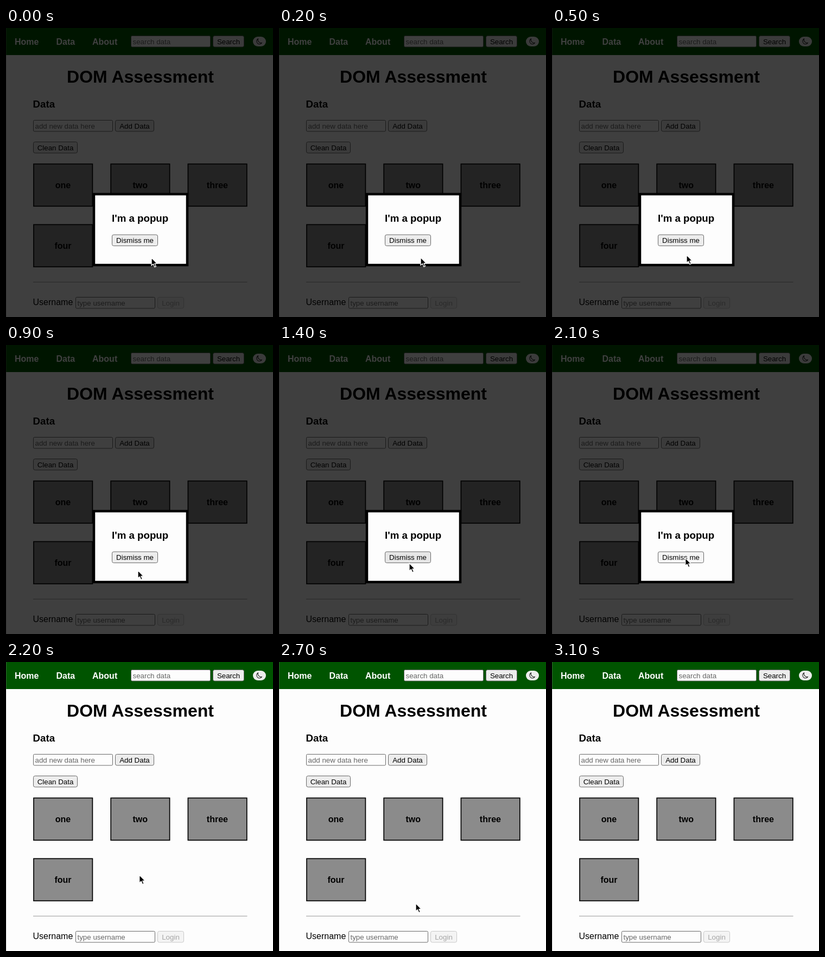
These frames come from a looping animation (492x534 px, 3500 ms). An HTML page:

```html
<!DOCTYPE html>
<html lang="en">
<head>
<meta charset="utf-8">
<title>Popup demo</title>
<style>
  html, body { margin: 0; width: 100%; height: 100%; overflow: hidden; background: #fdfdfd; }
  svg { display: block; font: 13.333px "Liberation Sans", Arial, sans-serif; }
  .h1 { font: bold 32px "Liberation Sans", Arial, sans-serif; }
  .h3 { font: bold 18.72px "Liberation Sans", Arial, sans-serif; }
  .bold { font: bold 16px "Liberation Sans", Arial, sans-serif; }
  .label { font-size: 16px; }
  .nav { fill: #fff; }
  .hint { fill: #666; }
  .off { fill: #a5a5a5; }
  .mid { text-anchor: middle; }
</style>
</head>
<body>
<svg width="492" height="534" viewBox="0 0 492 534">
  <g id="page"></g>
  <g id="modal">
    <rect width="492" height="534" fill-opacity=".75"/>
    <rect x="162" y="307" width="172" height="131" fill="#fdfdfd" stroke="#000" stroke-width="4.5"/>
  </g>
  <path id="cursor" d="M0 0V14.6L3.4 11.6 5.8 17.2 8.4 16.1 6 10.7H10.5Z"
        stroke="#fff" stroke-width="1.3" stroke-linejoin="round"/>
</svg>
<script>
const LOOP = 3500, STEP = 100, DISMISS = 2200, GONE = 2800;
const page = document.getElementById("page");
const modal = document.getElementById("modal");
const cursor = document.getElementById("cursor");

function add(parent, tag, attrs, content = "") {
  const node = document.createElementNS("http://www.w3.org/2000/svg", tag);
  for (const key in attrs) node.setAttribute(key, attrs[key]);
  node.textContent = content;
  return parent.appendChild(node);
}

const text = (parent, x, y, content, cls = "") =>
  add(parent, "text", { x, y, class: cls }, content);

const box = (parent, x, y, width, height, fill, stroke, rx = 0, line = 1) =>
  add(parent, "rect", { x, y, width, height, fill, stroke, rx, "stroke-width": line });

function input(x, y, hint) {
  box(page, x + .5, y + .5, 146, 20.5, "#fdfdfd", "#686868", 2);
  text(page, x + 3.5, y + 15.5, hint, "hint");
}

function button(parent, x, y, width, label, off) {
  const face = box(parent, x + .5, y + .5, width - 1, 20.5,
    off ? "#f4f4f4" : "#ededed", off ? "#c8c8c8" : "#686868", 3);
  text(parent, x + width / 2, y + 15.5, label, off ? "mid off" : "mid");
  return face;
}

box(page, 0, 0, 492, 50, "#005400", "none");
[["Home", 16], ["Data", 92.5], ["About", 159]]
  .forEach(([label, x]) => text(page, x, 30.5, label, "bold nav"));
input(230, 14, "search data");
button(page, 381, 14, 58, "Search");
box(page, 455, 16, 24, 18, "#ededed", "none", 9);
add(page, "path", {
  d: "M464.6 19.8A5.3 5.3 0 1 0 471.6 27.3 5.7 5.7 0 0 1 464.6 19.8Z",
  fill: "none", stroke: "#222", "stroke-width": 1.1, "stroke-linejoin": "round"
});

text(page, 247.5, 101, "DOM Assessment", "h1 mid");
text(page, 49.5, 147, "Data", "h3");
input(50, 170, "add new data here");
button(page, 201, 170, 72, "Add Data");
button(page, 50, 210, 82, "Clean Data");
["one", "two", "three", "four"].forEach((label, i) => {
  const x = 51 + i % 3 * 142.2, y = 251.3 + Math.floor(i / 3) * 112;
  box(page, x, y, 108.4, 78, "#8b8b8b", "#000", 0, 1.7);
  text(page, x + 54, y + 44.5, label, "bold mid");
});
box(page, 50, 469, 394.5, 1, "#9a9a9a", "none");
text(page, 49.5, 512, "Username", "label");
input(128, 497, "type username");
button(page, 279, 497, 49, "Login", true);
box(page, 0, 0, 1, 534, "#888", "none").setAttribute("fill-opacity", .35);

text(modal, 195, 358, "I'm a popup", "h3");
const dismiss = button(modal, 195, 381.5, 85, "Dismiss me");

// [time, x, y] of the pointer tip
const path = [
  [0, 268, 424.5], [100, 266, 425], [300, 256, 423], [500, 248, 419.5], [600, 248, 419.5],
  [700, 250, 418.5], [900, 243, 416.5], [1100, 226, 406], [1200, 235, 411],
  [1400, 240, 403], [1700, 246, 394], [2000, 246, 394], [2100, 245.7, 393.5],
  [2600, 246, 394], [2700, 252, 446], [3500, 252, 446]
];

function tipAt(t) {
  const i = path.findIndex(key => key[0] > t);
  const [t0, x0, y0] = path[i - 1], [t1, x1, y1] = path[i];
  const k = (t - t0) / (t1 - t0);
  return [x0 + (x1 - x0) * k, y0 + (y1 - y0) * k];
}

function draw(now) {
  const t = Math.floor(now % LOOP / STEP) * STEP;
  const [x, y] = tipAt(t);
  cursor.setAttribute("transform", `translate(${x} ${y})`);
  cursor.style.display = t < GONE ? "" : "none";
  modal.style.display = t < DISMISS ? "" : "none";
  dismiss.setAttribute("fill", t >= 2100 ? "#f5f5f5" : y <= 403 ? "#e6e6e6" : "#ededed");
}

const start = performance.now();
function tick() {
  draw(performance.now() - start);
  requestAnimationFrame(tick);
}
tick();
</script>
</body>
</html>
```
